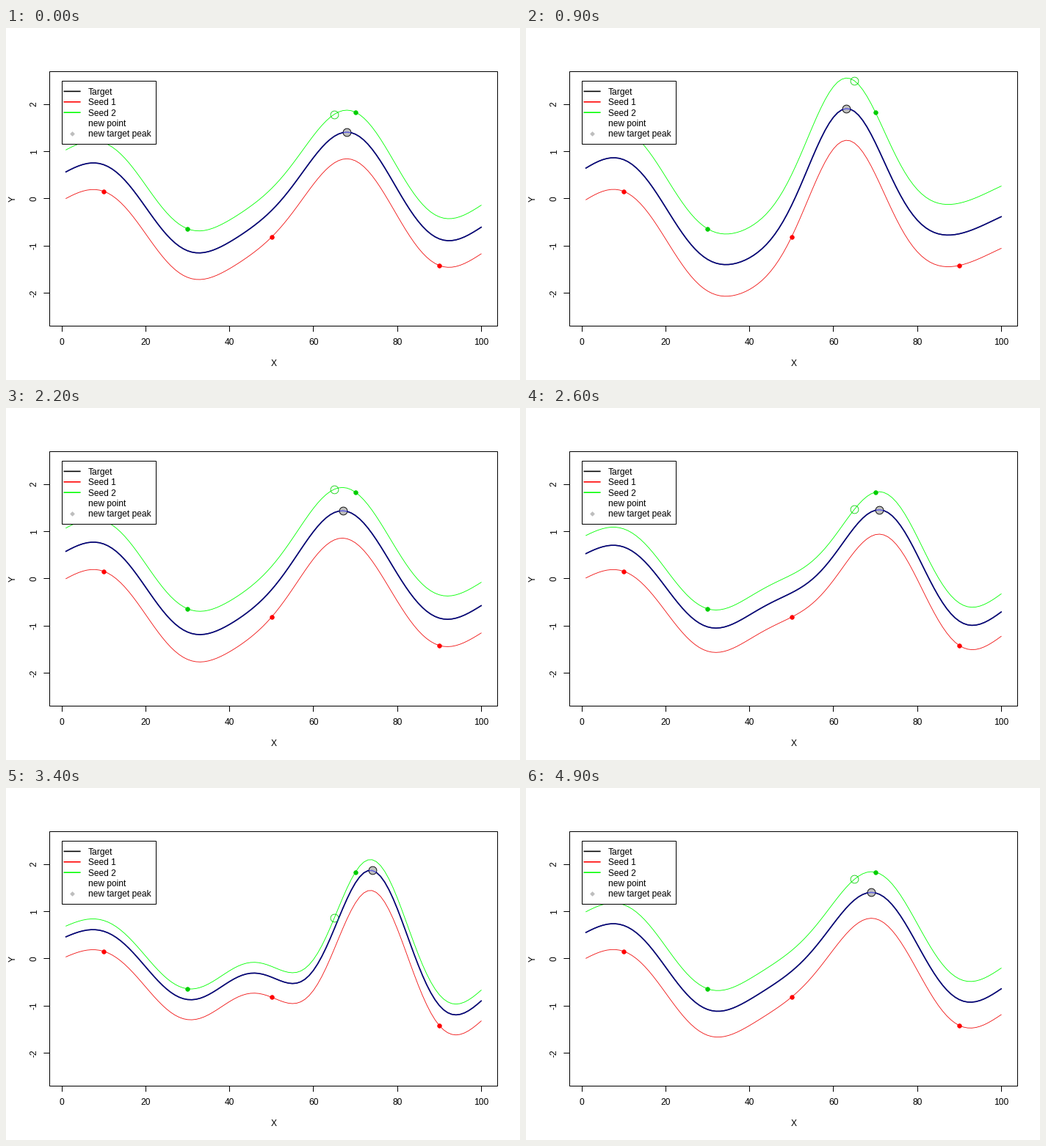
These frames come from a looping animation (700 by 480 pixels, 5000 ms). A matplotlib script:

```python
import numpy as np
import matplotlib.pyplot as plt
from matplotlib.animation import FuncAnimation
from matplotlib.patches import Rectangle

W, H, FRAMES, INTERVAL = 700, 480, 50, 100
PX = 0.72  # points per pixel at 100 dpi
LEFT, TOP, RIGHT, BOTTOM = 59.04, 59.04, 669.76, 406.56
RED, GREEN, GREEN3, GREY = "#ff0000", "#00ff00", "#00cd00", "#bebebe"

plt.rcParams["font.family"] = "Liberation Sans"
fig = plt.figure(figsize=(W / 100, H / 100), dpi=100, facecolor="white")
ax = fig.add_axes([0, 0, 1, 1])
ax.set_xlim(0, W)
ax.set_ylim(H, 0)
ax.axis("off")


def to_x(x):
    return LEFT + (np.asarray(x) + 2.96) * (RIGHT - LEFT) / 106.92


def to_y(y):
    return BOTTOM - (np.asarray(y) + 2.7) * (BOTTOM - TOP) / 5.4


def crisp(v):
    return np.floor(np.asarray(v) + 0.1) + 0.5


def line(xs, ys, color="black", width=1.0, z=2, **kw):
    return ax.plot(xs, ys, color=color, lw=width * PX, zorder=z,
                   snap=False, **kw)[0]


def dot(x, y, radius, face, edge, width=0.75, z=5, marker="o"):
    return ax.plot([x], [y], marker, ms=2 * radius * PX, mfc=face, mec=edge,
                   mew=width * PX, zorder=z, snap=False)[0]


def label(x, y, s, ha="center", rotation=0, z=2):
    ax.text(x, y, s, size=12 * PX, ha=ha, va="baseline", rotation=rotation,
            rotation_mode="anchor", zorder=z)


def box(x0, y0, x1, y1, face, z):
    ax.add_patch(Rectangle((x0, y0), x1 - x0, y1 - y0, fc=face, ec="black",
                           lw=PX, zorder=z, snap=False, joinstyle="miter"))


# Gaussian process: shared smooth curve plus one constant offset per seed
px = np.array([10, 50, 90, 30, 70, 65])
seed = np.array([1, 1, 1, 2, 2, 2])
known = np.array([0.157, -0.815, -1.414, -0.637, 1.834])
grid = np.arange(1, 101)


def kernel(a, b):
    return np.exp(-((a[:, None] - b[None, :]) / 10) ** 2 / 2)


cov = kernel(px, px) + (seed[:, None] == seed[None, :])
cross = kernel(grid, px)


def predict(y_new):
    w = np.linalg.solve(cov, np.append(known, y_new))
    target = cross @ w
    return target, target + w[seed == 1].sum(), target + w[seed == 2].sum()


# Frame and axes
box(*crisp([LEFT, TOP, RIGHT, BOTTOM]), "none", 1)
for v in range(0, 101, 20):
    x = crisp(to_x(v))
    line([x, x], [BOTTOM, BOTTOM + 7.2])
    label(to_x(v), 432.3, str(v))
for v in range(-2, 3):
    y = crisp(to_y(v))
    line([LEFT - 7.2, LEFT], [y, y])
    label(41.8, to_y(v), str(v), rotation=90)
label((LEFT + RIGHT) / 2, 461.3, "X")
label(13, (TOP + BOTTOM) / 2, "Y", rotation=90)

# Curves and points
xs = to_x(grid)
target_line = line(xs, xs, "black", 1.6, 3)
target_tint = line(xs, xs, "blue", 1.5, 7, alpha=0.5)
seed1_line = line(xs, xs, "#f01010", 0.85, 2)
seed2_line = line(xs, xs, GREEN, 0.85, 2)
for x, s, y in zip(px, seed, known):
    c = RED if s == 1 else GREEN3
    dot(to_x(x), to_y(y), 2.8, c, c)
new_point = dot(to_x(65), 0, 5.4, "none", GREEN3, 0.8)
peak = dot(0, 0, 5.4, GREY, "black", 0.9, 6)

# Legend
box(*crisp([76, 72, 204, 158]), "white", 10)
names = ["Target", "Seed 1", "Seed 2", "new point", "new target peak"]
for i, name in enumerate(names):
    label(112, 90.7 + 14.4 * i, name, ha="left", z=11)
for i, c in enumerate(["black", RED, GREEN]):
    y = 86.4 + 14.4 * i
    line([79.2, 100.8], [y, y], c, 1.6, 11)
dot(90, 144, 2.0, GREY, GREY, 0.75, 11, "D")


def update(k):
    y_new = 1.683 + 0.8586 * np.sin(2 * np.pi * (k + 1) / FRAMES)
    target, s1, s2 = predict(y_new)
    target_line.set_ydata(to_y(target))
    target_tint.set_ydata(to_y(target))
    seed1_line.set_ydata(to_y(s1))
    seed2_line.set_ydata(to_y(s2))
    new_point.set_ydata([to_y(y_new)])
    top = target.argmax()
    peak.set_data([xs[top]], [to_y(target[top])])
    return target_line, target_tint, seed1_line, seed2_line, new_point, peak


anim = FuncAnimation(fig, update, frames=FRAMES, interval=INTERVAL,
                     repeat=True, repeat_delay=0, blit=False)
plt.show()
```
